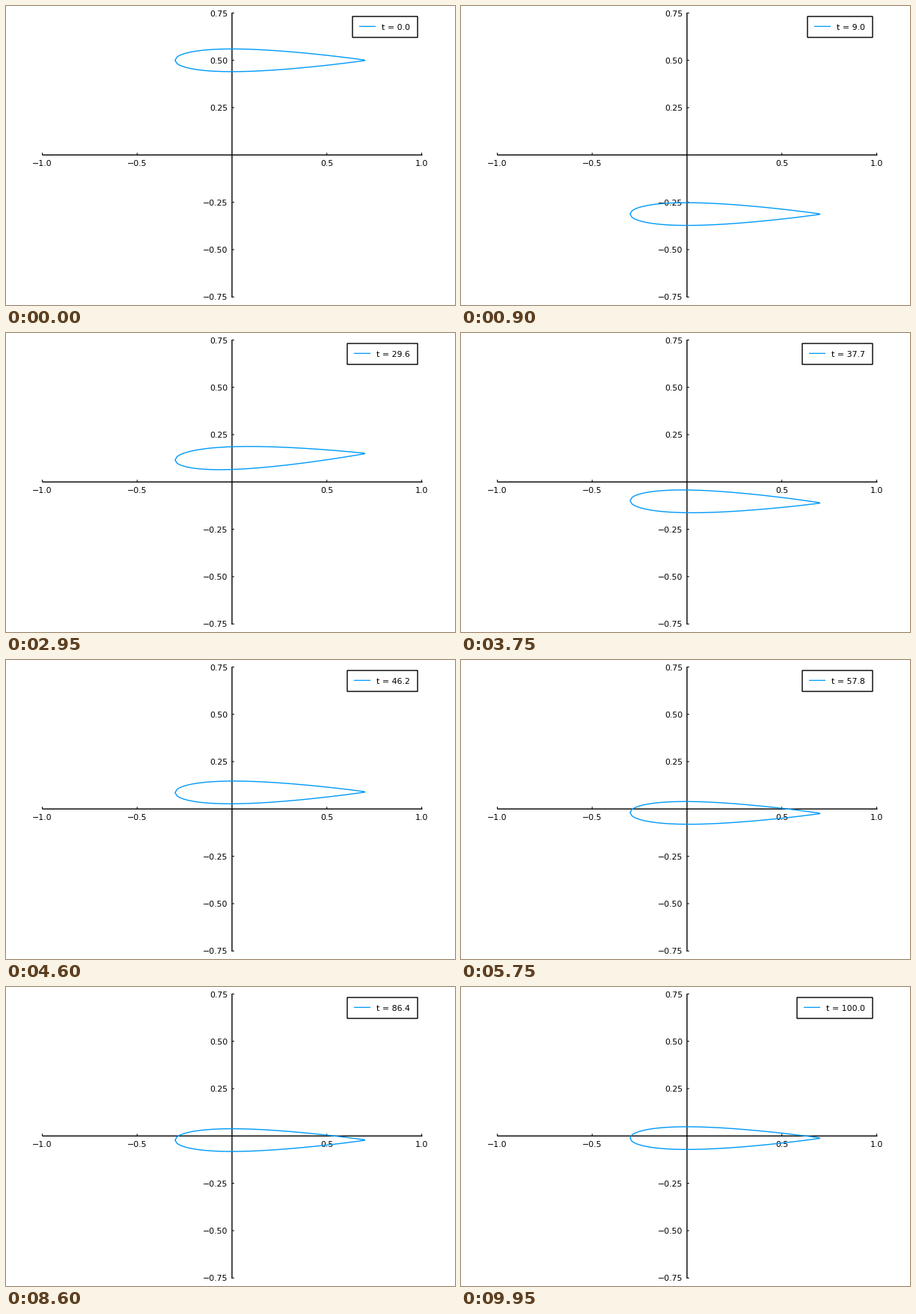
These frames come from a looping animation (600 px wide and 400 px high, 10000 ms). A matplotlib script:

```python
import numpy as np
import matplotlib.pyplot as plt
from matplotlib.animation import FuncAnimation

W, H, DPI = 600, 400, 100
FRAMES, T_END = 200, 100.0
X0, Y0, SX, SY = 302.0, 199.3, 253.5, 253.3
BLUE = "#009afa"
PT = 72 / DPI  # points per pixel
FONT = dict(family="DejaVu Sans", size=11 * PT, color="black", va="baseline")
DIGIT = 7  # advance of one digit in pixels

fig = plt.figure(figsize=(W / DPI, H / DPI), dpi=DPI, facecolor="white")
ax = fig.add_axes([0, 0, 1, 1])
ax.set_xlim(0, W)
ax.set_ylim(H, 0)
ax.axis("off")


def to_px(x, y):
    return X0 + SX * np.asarray(x), Y0 - SY * np.asarray(y)


def stroke(x, y, width=1.3, color="black", z=2):
    line, = ax.plot(x, y, color=color, lw=width * PT, zorder=z, snap=False,
                    solid_capstyle="butt", solid_joinstyle="miter")
    return line


def label(value, digits):
    return f"{value:.{digits}f}".replace("-", "\u2212")


def draw_axes():
    stroke([48.5, 556.5], [Y0, Y0], 1.4)
    stroke([X0, X0], [9, 390], 1.4)
    for v in (-1, -0.5, 0.5, 1):
        x = to_px(v, 0)[0]
        stroke([x, x], [Y0 - 3, Y0], 1)
        ax.text(x, 214, label(v, 1), ha="center", **FONT)
    for v in (-0.75, -0.5, -0.25, 0.25, 0.5, 0.75):
        y = to_px(0, v)[1]
        stroke([X0, X0 + 3], [y, y], 1)
        ax.text(296.5, y + 4.2, label(v, 2), ha="right", **FONT)


def foil_outline():
    """Symmetric 12 % section, pivot at 30 % chord."""
    c = np.linspace(0, 1, 101)
    t = 0.6 * (0.2969 * np.sqrt(c) - 0.126 * c - 0.3516 * c**2
               + 0.2843 * c**3 - 0.1015 * c**4)
    x = np.concatenate([c[::-1], c[1:]]) - 0.3
    y = np.concatenate([t[::-1], -t[1:]])
    return np.append(x, x[0]), np.append(y, y[0])


def plunge(t):
    main = 0.462 * np.exp(-0.0351 * t) * np.cos(np.radians(23.08 * t - 3.6))
    transient = 0.039 * np.exp(-0.18 * t) * np.cos(0.347 * t)
    return main + transient


def pitch(t):
    return -0.038 * t * np.exp(-0.108 * t) * np.sin(0.347 * t)


draw_axes()
FX, FY = foil_outline()
foil = stroke([], [], 1.4, BLUE, 4)
box, = ax.fill([0], [0], facecolor="white", edgecolor="black",
               lw=1.4 * PT, zorder=5, snap=False)
sample = stroke([], [], 1.3, BLUE, 6)
caption = ax.text(0, 31.5, "", ha="left", zorder=6, **FONT)


def update(i):
    t = i * T_END / (FRAMES - 1)
    a, h = pitch(t), plunge(t)
    foil.set_data(*to_px(FX * np.cos(a) - FY * np.sin(a),
                         h + FX * np.sin(a) + FY * np.cos(a)))

    text = f"{t:.1f}"
    left = 463 - DIGIT * (len(text) - 3)
    top, right, bottom = 14, 550, 42
    box.set_xy([(left, top), (right, top), (right, bottom), (left, bottom)])
    sample.set_data([left + 9, left + 31], [27.3, 27.3])
    caption.set_x(left + 39)
    caption.set_text("t = " + text)
    return foil, box, sample, caption


anim = FuncAnimation(fig, update, frames=FRAMES, interval=50,
                     repeat=True, repeat_delay=0, blit=False)
plt.show()
```
